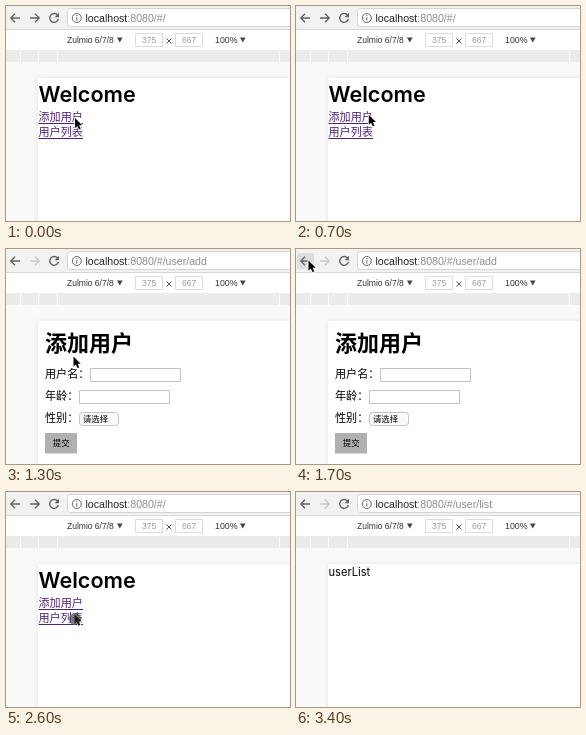
Recreate the animation shown at these times as an HTML page with a canvas. Size 284 by 215 pixels, loop 3.5 s.

```html
<!DOCTYPE html>
<html lang="zh">
<head>
<meta charset="utf-8">
<title>Router demo</title>
<style>
html, body { margin: 0; width: 100%; height: 100%; overflow: hidden; background: #fff; }
canvas { display: block; }
</style>
</head>
<body>
<canvas id="stage" width="284" height="215"></canvas>
<script>
const ctx = document.getElementById('stage').getContext('2d');
const LOOP = 3500, STEP = 100;
const SANS = '"Liberation Sans", Arial, sans-serif';
const PAGE = 'Inter, sans-serif';
const CJK = '"Noto Sans CJK SC", "Noto Sans CJK", sans-serif';
const LINK = '#4d2478', BORDER = '#c2c2c2';

// [time, x, y] of the pointer tip
const pointerPath = [
  [0, 69, 112], [400, 79, 108], [600, 78, 110], [800, 67.5, 107.5],
  [1300, 67.5, 107.5], [1700, 12.5, 11.5], [2100, 11.5, 10], [2200, 11.5, 10],
  [2500, 68.5, 122], [3000, 68.5, 122], [3300, 72, 118], [3500, 72, 118]
];
// press: dark dot, release: ring
const clicks = [{ press: 1000, release: 1100 }, { press: 1800, release: 1900 }, { press: 2600, release: 2800 }];
const arrow = new Path2D('M0 0V10L2.3 7.9L4 11.6L5.7 10.9L4.1 7.3L7.2 7.2Z');

function rect(x, y, w, h, fill, stroke, radius = 0) {
  ctx.beginPath();
  ctx.roundRect(x, y, w, h, radius);
  if (fill) { ctx.fillStyle = fill; ctx.fill(); }
  if (stroke) { ctx.strokeStyle = stroke; ctx.lineWidth = 1; ctx.stroke(); }
}

function text(str, x, y, size, color = '#000', family = SANS, weight = 400) {
  ctx.font = `${weight} ${size}px ${family}`;
  ctx.fillStyle = color;
  ctx.fillText(str, x, y);
  return x + ctx.measureText(str).width;
}

function line(path, color, width = 1.4) {
  ctx.strokeStyle = color;
  ctx.lineWidth = width;
  ctx.stroke(new Path2D(path));
}

function triangle(x, y) {
  ctx.fillStyle = '#444';
  ctx.fill(new Path2D(`M${x} ${y}h5.6l-2.8 5z`));
}

function drawToolbar(url, canForward, hoverBack) {
  rect(0, 0, 284, 24, '#f2f2f2');
  if (hoverBack) rect(1, 4, 17, 16, '#dedede', null, 2);
  line('M14 12H5M9 7.7L4.8 12L9 16.3', '#636363');
  line('M24 12H33M29 7.7L33.2 12L29 16.3', canForward ? '#636363' : '#cacaca');
  line('M51.6 9.2A4.4 4.4 0 1 0 52.4 13', '#636363');
  ctx.fillStyle = '#636363';
  ctx.fill(new Path2D('M53 6.8V11.2H48.6Z'));
  rect(61.5, 2.5, 240, 18, '#fff', '#d4d4d4', 3);
  line('M75.3 12A4.5 4.5 0 1 1 66.3 12A4.5 4.5 0 1 1 75.3 12M70.8 11.2V14.6M70.8 9V10.2', '#666', 1);
  const x = text('localhost', 79.5, 16, 10.6, '#222');
  text(':8080/#/' + url, x, 16, 10.6, '#8c8c8c');
  rect(0, 23, 284, 1, '#d6d6d6');
}

function drawDeviceBar() {
  rect(0, 24, 284, 20, '#fff');
  text('Zulmio 6/7/8', 61, 37, 8.5, '#333');
  triangle(111, 31.5);
  for (const [x, value] of [[129.5, '375'], [169.5, '667']]) {
    rect(x, 27.5, 27, 13, '#fff', '#dcdcdc');
    text(value, x + 6.5, 37, 8.5, '#9a9a9a');
  }
  line('M160.5 32.5l5 5m0 -5l-5 5', '#555', 1);
  text('100%', 209, 37, 8.8, '#333');
  triangle(234, 31.5);
  rect(0, 44, 284, 12, '#ebebeb');
  for (const x of [14, 32, 51, 273]) rect(x, 45, 1, 11, '#fff');
}

function drawViewport() {
  rect(0, 56, 284, 159, '#f9f9f9');
  ctx.save();
  ctx.shadowColor = 'rgba(0,0,0,.09)';
  ctx.shadowBlur = 5;
  rect(32, 72, 300, 200, '#fff');
  ctx.restore();
}

function link(label, y) {
  text(label, 32.5, y, 11.1, LINK, CJK);
  rect(32.5, y + 1.7, 44.5, 1, LINK);
}

function field(label, x, y) {
  text(label, 39, y + 9.6, 11.1, '#000', CJK);
  rect(x, y, 90, 13, '#fff', BORDER);
}

const pages = {
  home() {
    text('Welcome', 32.5, 96, 21.6, '#000', PAGE, 600);
    link('添加用户', 115.3);
    link('用户列表', 130.3);
  },
  add() {
    text('添加用户', 39, 102.3, 22, '#000', CJK, 700);
    field('用户名：', 84.5, 119.5);
    field('年龄：', 73.5, 141.5);
    text('性别：', 39, 173.3, 11.1, '#000', CJK);
    rect(73.5, 163.5, 39, 13, '#fafafa', BORDER, 3);
    text('请选择', 77, 173.3, 8.4, '#000', CJK);
    rect(39, 184, 32, 20.5, '#b0b0b0');
    text('提交', 46.8, 197.3, 8.4, '#000', CJK);
  },
  list() {
    text('userList', 32.5, 84, 11.1, '#000', PAGE);
  }
};

function pointerAt(t) {
  const i = pointerPath.findIndex(p => p[0] > t);
  const [t0, x0, y0] = pointerPath[i - 1], [t1, x1, y1] = pointerPath[i];
  const k = (t - t0) / (t1 - t0), ease = k * k * (3 - 2 * k);
  return [x0 + (x1 - x0) * ease, y0 + (y1 - y0) * ease];
}

function drawPointer(t) {
  const [x, y] = pointerAt(t);
  ctx.save();
  ctx.translate(x, y);
  ctx.lineJoin = 'round';
  ctx.strokeStyle = '#fff';
  ctx.lineWidth = 1.6;
  ctx.stroke(arrow);
  ctx.fillStyle = '#000';
  ctx.fill(arrow);
  for (const { press, release } of clicks) {
    if (t < press || t >= release + STEP) continue;
    const released = t >= release;
    ctx.beginPath();
    ctx.arc(0.5, released ? 3 : 5, released ? 14 : 6, 0, Math.PI * 2);
    if (released) {
      ctx.strokeStyle = '#111';
      ctx.lineWidth = 2.2;
      ctx.stroke();
    } else {
      ctx.fillStyle = 'rgba(50,50,50,.6)';
      ctx.fill();
    }
  }
  ctx.restore();
}

function draw(now) {
  const t = Math.floor(now % LOOP / STEP) * STEP;
  const page = t >= 2900 ? 'list' : t >= 1200 && t < 2000 ? 'add' : 'home';
  drawViewport();
  drawToolbar(page === 'home' ? '' : 'user/' + page, page === 'home', t >= 1700 && t < 2300);
  drawDeviceBar();
  pages[page]();
  if (t < 3400) drawPointer(t);
}

const start = performance.now();
function tick() {
  draw(performance.now() - start);
  requestAnimationFrame(tick);
}
tick();
</script>
</body>
</html>
```
